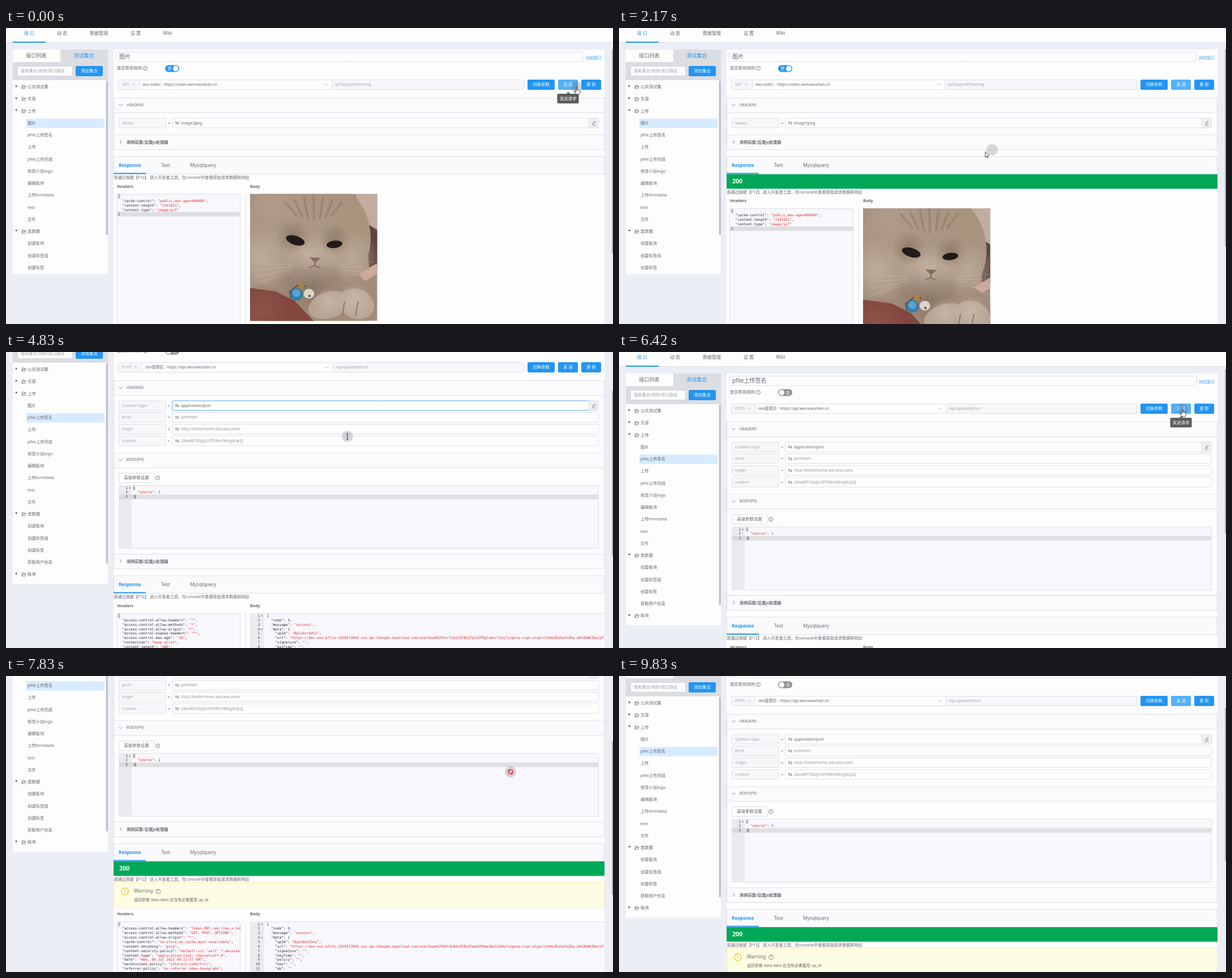
An HTML page with a canvas that plays this animation: 1072x522 px, repeating every 9910 ms.

```html
<!DOCTYPE html>
<html lang="zh-CN">
<head>
<meta charset="utf-8">
<title>API console</title>
<style>
html,body{margin:0;width:100%;height:100%;overflow:hidden;background:#eceef6}
canvas{display:block;width:1072px;height:522px}
</style>
</head>
<body>
<canvas id="stage"></canvas>
<script>
const W = 1072, H = 522, LOOP = 9910;
const canvas = document.getElementById('stage');
const g = canvas.getContext('2d');
const dpr = window.devicePixelRatio || 1;
canvas.width = W * dpr;
canvas.height = H * dpr;

const SANS = '"Noto Sans","Noto Sans CJK SC","Noto Sans CJK",sans-serif';
const MONO = '"DejaVu Sans Mono","Noto Sans Mono",monospace';
const BLUE = '#2395f1', LIGHT = '#55b1f8', INK = '#66666e', PALE = '#a2a2aa';
const LINE = '#dddfe7', WHITE = '#fdfdfe', FIELD = '#f7f7fa', EDITOR = '#f8f7fc';
const STEP = 7.85;

// Event times (ms)
const T = { bar: 830, leave: 1830, grow: 2500, hover: 2830, open: 3670, result: 7000 };

// Keys: time, values...
const POINTER = [[0, 1007, 104], [1830, 1007, 104], [1900, 1016, 105], [2170, 648, 218],
  [2620, 118, 200], [2830, 86, 194], [3670, 86, 194], [4250, 603, 149], [5650, 603, 149],
  [6170, 994, 101], [7050, 994, 101], [7450, 891, 169], [9000, 891, 169], [9330, 1100, 545]];
const SCROLL = [[4660, 0], [4830, 72], [5000, 172], [5250, 172], [5750, 0], [7160, 0],
  [7500, 115], [7700, 172], [7870, 172], [8000, 229], [8250, 229], [8580, 172],
  [8750, 172], [9300, 56]];

function at(keys, t, i = 1) {
  if (t <= keys[0][0]) return keys[0][i];
  for (let k = 1; k < keys.length; k++) {
    const a = keys[k - 1], b = keys[k];
    if (t <= b[0]) return a[i] + (b[i] - a[i]) * (t - a[0]) / (b[0] - a[0]);
  }
  return keys[keys.length - 1][i];
}

function rect(x, y, w, h, fill) {
  g.fillStyle = fill;
  g.fillRect(x, y, w, h);
}
function box(x, y, w, h, fill, stroke, r = 2) {
  const d = stroke ? .5 : 0;
  g.beginPath();
  g.roundRect(x + d, y + d, w - 2 * d, h - 2 * d, r);
  if (fill) { g.fillStyle = fill; g.fill(); }
  if (stroke) { g.strokeStyle = stroke; g.lineWidth = 1; g.stroke(); }
}
function text(s, x, y, size = 7.3, color = INK, weight = 400, font = SANS) {
  g.font = `${weight} ${size}px ${font}`;
  g.fillStyle = color;
  g.fillText(s, x, y);
}
function label(s, x, y, size, color, weight) {
  g.textAlign = 'center';
  text(s, x, y, size, color, weight);
  g.textAlign = 'left';
}
function path(points, color, width = .8, fill) {
  g.beginPath();
  for (let i = 0; i < points.length; i += 2) g.lineTo(points[i], points[i + 1]);
  if (fill) { g.closePath(); g.fillStyle = fill; g.fill(); }
  if (color) { g.strokeStyle = color; g.lineWidth = width; g.stroke(); }
}
function oval(x, y, rx, ry, fill, rot = 0) {
  g.beginPath();
  g.ellipse(x, y, rx, ry, rot, 0, 7);
  g.fillStyle = fill;
  g.fill();
}
function glow(x, y, r, color) {
  const c = g.createRadialGradient(x, y, 0, x, y, r);
  c.addColorStop(0, color);
  c.addColorStop(1, color.slice(0, 7) + '00');
  oval(x, y, r, r, c);
}
function ring(x, y, r, color, width = .8) {
  g.beginPath();
  g.arc(x, y, r, 0, 7);
  g.strokeStyle = color;
  g.lineWidth = width;
  g.stroke();
}
const down = (x, y, c = PALE) => path([x - 3, y - 1.5, x, y + 1.5, x + 3, y - 1.5], c);
const right = (x, y) => path([x - 1.5, y - 3, x + 1.5, y, x - 1.5, y + 3], INK);
function help(x, y, r = 3.5) {
  ring(x, y, r, INK);
  label('?', x, y, r * 1.6, INK);
}

function code(s, x, y, plain = '#26262e', key = plain) {
  const part = /("[^"]*"(?=:))|("[^"]*"?)|(\d+)|([^"\d]+)/g;
  for (const m of s.matchAll(part)) {
    const color = m[1] ? key : m[2] ? '#dd2a2a' : m[3] ? '#3030d0' : plain;
    text(m[0], x + m.index * 3.7, y, 6.15, color, 400, MONO);
  }
}
function lines(list, x, y, key) {
  list.forEach((s, i) => code(s, x, y + i * STEP, '#26262e', key));
}
function gutter(x, y, h, w, list) {
  rect(x, y, w, h, '#ebebef');
  g.textAlign = 'right';
  list.forEach((s, i) => {
    const ly = y + 4.5 + i * STEP;
    text(i + 1, x + w - 7, ly, 6.15, '#44444c', 400, MONO);
    if (/{$/.test(s)) path([x + w - 5, ly - 1, x + w - 2, ly - 1, x + w - 3.5, ly + 1], null, 0, '#55555c');
  });
  g.textAlign = 'left';
}

const IMG_HEAD = ['{', '  "cache-control": "public,max-age=604800",',
  '  "content-length": "2141921",', '  "content-type": "image/gif"', '}'];
const OLD_HEAD = ['{', ...['headers', 'methods', 'origin'].map(k => `  "access-control-allow-${k}": "*",`),
  '  "access-control-expose-headers": "*",', '  "access-control-max-age": "10",',
  '  "connection": "keep-alive",', '  "content-length": "480",',
  '  "content-type": "application/json",', '  "vary": "Origin"', '}'];
const NEW_HEAD = ['{', '  "access-control-allow-headers": "Token,DNT,req-time,x-token,Origin"',
  '  "access-control-allow-methods": "GET, POST, OPTIONS",', '  "access-control-allow-origin": "*",',
  '  "cache-control": "no-store,no-cache,must-revalidate",', '  "content-encoding": "gzip",',
  '  "content-security-policy": "default-src \'self\' *.wenxiaozhan.cn",',
  '  "content-type": "application/json; charset=utf-8",', '  "date": "Wed, 06 Jul 2022 09:11:37 GMT",',
  '  "permissions-policy": "interest-cohort=()",', '  "referrer-policy": "no-referrer-when-downgrade",',
  '  "server": "nginx",', '  "vary": "Accept-Encoding",', '  "x-frame-options": "SAMEORIGIN"', '}'];
const bodyOf = (id, dir) => ['{', '  "code": 0,', '  "message": "success",', '  "data": {',
  `    "upId": "${id}",`,
  `    "url": "https://dev-wxz-pfile-1259372845.cos.ap-chengdu.myqcloud.com/userhead%2F${dir}?sign=q-sign-algorithm%3Dsha1%26q-ak%3DAKIDwtjP`,
  ...['signature', 'keyTime', 'policy', 'key'].map(k => `    "${k}": "",`), '    "ak": ""', '  }', '}'];
const OLD_BODY = bodyOf('8gluknr6dt3', 'knr7sdj%2F8%2Fgl%2F8gluknr7sdj');
const NEW_BODY = bodyOf('8qe16d125ny', '6d13k8e%2F8%2Fqe%2F8qe16d13k8e');

const ITEMS = ['>公共测试集', '>文章', 'v上传', '图片', 'pfile上传签名', '上传', 'pfile上传完成',
  '修改小站logo', '编辑板块', '上传formdata', 'test', '文件', 'v造数据', '创建板块', '创建标签组',
  '创建标签', '获取用户信息', '>板块'];

function topBar() {
  rect(0, 0, W, 25, WHITE);
  rect(0, 25, W, 1, '#dcdee6');
  [['接 口', 41], ['动 态', 99], ['数据管理', 164], ['设 置', 229], ['Wiki', 285.5]]
    .forEach(([s, x], i) => label(s, x, 9.7, 8, i ? INK : BLUE));
  rect(12, 24, 58, 2, BLUE);
}

function sidebar(t) {
  const grown = t >= T.grow, bottom = grown ? 482 : 434;
  rect(12, 38, 168, bottom - 38, WHITE);
  rect(96, 38, 84, 23, '#dcdde1');
  rect(12, 60, 168, 32, '#dcdde1');
  label('接口列表', 53.5, 49.5, 9.1, INK);
  label('测试集合', 137.5, 49.5, 9.1, BLUE);
  box(20, 67, 98, 18, WHITE, '#d4d6de');
  text('搜索集合/用例/接口路径', 26, 76, 7.2, PALE);
  box(123, 67, 48, 18, BLUE);
  label('添加集合', 147, 76, 7.4, '#fff');
  const active = t >= T.open ? 4 : 3;
  ITEMS.slice(0, grown ? 18 : 16).forEach((s, i) => {
    const y = 104 + i * 21.25;
    if (i === active) rect(36, y - 8, 138, 16.5, '#d7ebfe');
    else if (i === 4 && t >= T.hover) {
      rect(36, y - 8, 138, 16.5, '#edfafe');
      ring(141, y - 2, 3, INK);
      path([138, y - 2, 144, y - 2], INK);
      box(151, y - 6, 5, 8, null, INK, 1);
      path([164.5, y - 5, 171, y - 5], INK);
      box(165, y - 5, 5, 7, null, INK, 1);
    }
    const kind = s[0];
    if (kind !== '>' && kind !== 'v') return text(s, 38, y, 7.3);
    text(s.slice(1), 38, y, 7.4);
    if (kind === 'v') path([16, y - 3, 20.5, y - 3, 18.2, y], null, 0, '#555');
    else path([17, y - 3.7, 20, y - 1.5, 17, y + .7], null, 0, '#555');
    path([28.5, y + 3, 28.5, y - 3, 31, y - 3, 32, y - 2, 34, y - 2, 34, y - .5, 30, y - .5,
      28.5, y + 3, 33.5, y + 3, 35.2, y - .5, 34, y - .5], INK, .8);
  });
  rect(176.5, 93, 3.5, grown ? 353 : 272, '#c2c3ca');
}

function button(s, x, w, fill) {
  box(x, 91, w, 18, fill);
  label(s, x + w / 2, 100.2, 7.4, '#fff');
}

function request(t, img) {
  box(194, 42, 827, 17.5, WHITE, LINE);
  text(img ? '图片' : 'pfile上传签名', 200, 51, 10);
  text('对应接口', 1024, 52.7, 6.8, BLUE);
  text('是否禁用用例:', 196, 71, 7.3);
  help(246, 71);
  box(281, 65.5, 25, 12, img ? BLUE : '#8f8f95', null, 6);
  oval(img ? 299.7 : 287.3, 71.5, 4.8, 4.8, '#fff');
  label(img ? '禁' : '启', img ? 289 : 298.5, 71.5, 7, '#fff');

  const s = img ? 235 : 240, p = img ? 575 : 577;
  box(198, 91, s - 197, 18, FIELD, LINE);
  box(s, 91, p - s + 1, 18, WHITE, LINE);
  box(p, 91, 915 - p, 18, FIELD, LINE);
  text(img ? 'GET' : 'POST', 205, 100, 7, PALE);
  down(s - 10, 100);
  text(img ? 'wxz-static：https://static.wenxiaozhan.cn' : 'dev管理员：https://api.wenxiaozhan.cn', s + 6, 100, 6.8);
  down(p - 10, 100);
  text(img ? '/pf/8qcjsrle594/img' : '/ap/upload/pf/url', p + 5, 100, 7, PALE);

  const lit = t < T.open || (t > 6170 && t < 9750) || t >= 9830;
  button('切换参数', 921, 48, BLUE);
  button('发 送', 975, 35, lit ? LIGHT : BLUE);
  button('更 新', 1016, 35, BLUE);
}

function section(y, s, open) {
  rect(190, y - 13, 867, 1, LINE);
  rect(190, y - 12, 867, 25, '#fbfbfd');
  rect(190, y + 13, 867, 1, LINE);
  if (open) down(202.5, y, INK); else right(202.5, y);
  text(s, 213, y + (open ? 0 : .5), open ? 6.8 : 7.2, INK, open ? 400 : 600);
}

function row(i, name, value, t) {
  const y = 167.5 + i * 20.7, first = !i;
  const lit = first && name !== 'binary' && t > 4740 && t < 5300;
  box(199, y - 9, 84, 18, FIELD, LINE);
  text(name, 205, y, 7, PALE);
  text('=', 286, y, 7);
  box(293, y - 9, 754, 18, WHITE, LINE);
  if (lit) box(293, y - 9, 737, 18, null, '#66b9f8');
  path([305.5, y - 1, 299, y - 1, 301, y - 3], INK, .8);
  path([299, y + 1, 305.5, y + 1, 303.5, y + 3], INK, .8);
  text(value, 309, y, 7, first ? INK : '#93939b');
  if (first) {
    box(1029, y - 9, 18, 18, '#f0f0f3', LINE);
    path([1036, y + 2.5, 1036, y + .5, 1039.5, y - 3, 1041, y - 1.5, 1037.5, y + 2], INK, .9);
    path([1035, y + 4, 1041, y + 4], INK, .7);
  }
}

function bodyEditor() {
  section(263.5, 'BODY(F9)', true);
  box(199, 286, 63, 18, WHITE, LINE);
  label('高级参数设置', 230.5, 295, 7.4);
  help(268, 295);
  const src = ['{', '  "source": 1', '}'];
  box(199, 308, 848, 112, EDITOR, LINE, 1);
  gutter(199.5, 308.5, 111, 22.5, src);
  rect(199.5, 324.5, 22.5, 8, '#d8d8dd');
  g.textAlign = 'right';
  text('3', 215, 328.7, 6.15, '#44444c', 400, MONO);
  g.textAlign = 'left';
  rect(222, 324.5, 825, 8, '#dfdfe4');
  lines(src, 224.5, 313, '#d42a2a');
  box(224, 309, 4, 7.5, null, '#b9b9c2', 0);
  rect(228.5, 325, .8, 7, '#333');
}

function cat(x, y, t) {
  const ramp = Math.min(1, Math.max(0, (t - 830) / 1100));
  const wob = .5 * Math.sin(t / 330) * ramp;
  g.save();
  g.beginPath();
  g.rect(x, y, 224.5, 224);
  g.clip();
  g.translate(x, y);
  rect(0, 0, 225, 224, '#a28e7e');
  path([186, 0, 225, 0, 225, 66, 208, 56], null, 0, '#c2aca0');
  path([206, 52, 225, 64, 225, 130, 210, 130], null, 0, '#5d453f');
  path([194, 140, 225, 122, 225, 140, 200, 156], null, 0, '#cda99d');
  g.translate(5 * ramp + wob, -4.3 * ramp + wob);
  // Fur: one base tone, soft lights and shadows
  oval(100, 78, 113, 112, '#a8937f');
  oval(120, 190, 104, 62, '#a18b79');
  glow(20, 112, 62, '#bfad9bee');
  glow(178, 112, 50, '#bda999ee');
  glow(108, 116, 52, '#c8b7a6ff');
  glow(112, 40, 60, '#b09b89aa');
  glow(40, 25, 60, '#b3a08eaa');
  glow(76, 74, 30, '#806d5d99');
  glow(150, 80, 28, '#806d5d99');
  glow(108, 162, 60, '#78635588');
  for (let i = -3; i <= 3; i++)
    path([112 + i * 17, 2 + Math.abs(i) * 4, 113 + i * 10, 48 - Math.abs(i) * 3], 'rgba(105,86,72,.25)', 4);
  oval(80, 82, 17, 8, '#211c1b', .3);
  oval(149, 89, 14, 6.5, '#211c1b', -.12);
  path([105, 112, 125, 113, 115, 122], null, 0, '#866862');
  path([104, 130, 114, 127, 115, 121, 115, 127, 125, 131], '#7b655a', 1.5);
  for (let i = 0; i < 4; i++) {
    path([75, 125 + i * 4, 8, 122 + i * 12], 'rgba(225,214,202,.4)', .7);
    path([157, 126 + i * 4, 218, 120 + i * 9], 'rgba(225,214,202,.4)', .7);
  }
  path([-8, 165, 45, 172, 78, 188, 118, 230, -8, 230], null, 0, '#81473f');
  glow(20, 205, 50, '#955850aa');
  oval(140, 196, 38, 23, '#b7a493', -.3);
  oval(188, 194, 32, 26, '#baa797', .4);
  glow(140, 190, 28, '#cab9a9cc');
  glow(185, 186, 30, '#cab9a9cc');
  path([167, 190, 163, 215], '#8d7868', 2);
  path([191, 190, 186, 215], '#8d7868', 2);
  path([72, 184, 70, 172, 84, 162, 98, 163], '#5d443a', 2);
  oval(90, 163, 5, 5, '#a98341');
  oval(82, 177, 11, 11, '#347ca9');
  oval(82, 175, 7, 7, '#58a4d0');
  oval(104, 176, 9.5, 8.5, '#ddd4c9');
  oval(105, 180, 2, 2, '#55483f');
  g.restore();
}

function response(t, img) {
  let y = img ? 226 : 467;
  const done = img ? t >= T.bar : t >= T.result, warn = done && !img;
  box(190, y, 867, 32, '#fafafc', LINE, 0);
  text('Response', 199, y + 17, 8.3, BLUE, 600);
  text('Test', 274, y + 17, 8.4);
  text('Mysqlquery', 325, y + 17, 8.4);
  rect(190, y + 29.5, 57, 2, BLUE);
  y += 32;
  if (done) {
    rect(190, y, 867, 25.5, '#00a857');
    text('200', 200, y + 13.3, 10.6, '#fff', 600);
    y += 25.5;
  }
  text('请通过按键【F12】 进入开发者工具、在console中查看原始请求数据和响应', 190, y + 6.3, 7.17);
  if (warn) {
    box(190, y + 11, 867, 45.5, '#fdfde3', '#f7ecaa', 1);
    ring(210, y + 27.5, 6.2, '#f6bd20', 1.2);
    rect(209.4, y + 24, 1.2, 4.5, '#f6bd20');
    rect(209.4, y + 29.8, 1.2, 1.3, '#f6bd20');
    text('Warning', 226, y + 27.5, 8.4);
    help(268.5, y + 27.5, 4);
    text('返回参数 data.data 应当有必需属性 up_id', 226, y + 42, 7);
    y += 46;
  }
  text('Headers', 196, y + 21.5, 7, INK, 600);
  text('Body', 431, y + 21.5, 7, INK, 600);
  y += 35;
  const h = img ? 330 : 350, head = img ? IMG_HEAD : warn ? NEW_HEAD : OLD_HEAD;
  rect(423, y, 1, h, LINE);
  g.save();
  g.beginPath();
  g.rect(195, y - 1, 219, h + 1);
  g.clip();
  box(195, y - .5, 219, h, EDITOR, LINE, 1);
  rect(195.5, y + (head.length - 1) * STEP, 218, 8, '#dedee3');
  lines(head, 198, y + 4.5);
  box(197.5, y, 4.5, 8, null, '#c4c4cc', 0);
  g.restore();
  if (img) return cat(431, y - .5, t);
  const body = warn ? NEW_BODY : OLD_BODY;
  g.save();
  g.beginPath();
  g.rect(431, y - 1, 626, h + 1);
  g.clip();
  box(431, y - .5, 640, h, EDITOR, LINE, 1);
  gutter(431.5, y, h, 24, body);
  lines(body, 460.5, y + 4.5);
  g.restore();
}

function panel(t) {
  const img = t < T.open;
  rect(190, 38, 867, img ? 620 : 940, WHITE);
  request(t, img);
  section(136, 'HEADERS', true);
  if (img) row(0, 'binary', 'image/jpeg', t);
  else {
    [['Content-Type', 'application/json'], ['prod', 'postman'], ['origin', 'http://testerhome.dev.wss.zone'],
      ['x-token', '2AxdWT3QzJCs9TSRio5MVg6Up2J']].forEach(([k, v], i) => row(i, k, v, t));
    bodyEditor();
  }
  const end = img ? 201 : 442;
  section(end, '用例前置/后置js处理器', false);
  rect(190, 123, 1, end - 109, LINE);
  rect(1056, 123, 1, end - 109, LINE);
  response(t, img);
}

function tooltip(t) {
  if (!(t < T.leave + 60 || (t > 6330 && t < 7100))) return;
  path([989.5, 116.5, 993, 112.5, 996.5, 116.5], null, 0, '#5d5d60');
  box(973.5, 116, 38, 17, '#5d5d60');
  label('发送请求', 992.5, 125, 7.4, '#fff');
}

function scrollbar(t, s) {
  let y = 37, h = t < T.bar ? 361 : 348;
  if (t >= T.result) { y = 27 + .517 * s; h = 270; }
  else if (t >= T.open) { y = 30 + .53 * s; h = 290; }
  rect(1070, y, 2, h, '#b4b5bb');
}

const hand = [0, 0, 1.6, 0, 1.6, 5, 6.5, 6, 7.2, 7.5, 6.5, 11.5, 5.5, 13, .5, 13, -3.2, 8, -2.4, 6.8, 0, 8.2];
const arrow = [0, 0, 0, 10, 2.3, 8, 3.8, 11, 5.2, 10.4, 3.8, 7.4, 6.7, 7];

function pointer(t) {
  if (t > 9330) return;
  const x = at(POINTER, t), y = at(POINTER, t, 2);
  const late = t - 9;
  oval(at(POINTER, late), at(POINTER, late, 2), 10, 10, 'rgba(105,105,115,.25)');
  g.save();
  g.translate(x, y);
  if (t >= 4250 && t < 5650) {
    path([-2, -5, 2, -5], '#333');
    path([0, -5, 0, 5], '#333', 1);
    path([-2, 5, 2, 5], '#333');
  } else if (t >= 7450 && t < 9000) {
    oval(0, 0, 4.5, 4.5, '#fff');
    ring(0, 0, 4, '#d41d32', 1.6);
    path([-2.8, -2.8, 2.8, 2.8], '#d41d32', 1.6);
  } else {
    const onLink = t < 1900 || (t > 2620 && t < 3830) || (t > 6120 && t < 7100);
    g.lineJoin = 'round';
    path([...(onLink ? hand : arrow), 0, 0], '#333', .9, '#fff');
  }
  g.restore();
}

function draw(now) {
  const t = now % LOOP, s = Math.round(at(SCROLL, t));
  g.setTransform(dpr, 0, 0, dpr, 0, 0);
  g.textBaseline = 'middle';
  g.textAlign = 'left';
  rect(0, 0, W, H, '#eceef6');
  g.save();
  g.translate(0, -s);
  topBar();
  sidebar(t);
  panel(t);
  tooltip(t);
  g.restore();
  scrollbar(t, s);
  pointer(t);
}

const start = performance.now();
function frame() {
  draw(performance.now() - start);
  requestAnimationFrame(frame);
}
frame();
</script>
</body>
</html>
```
